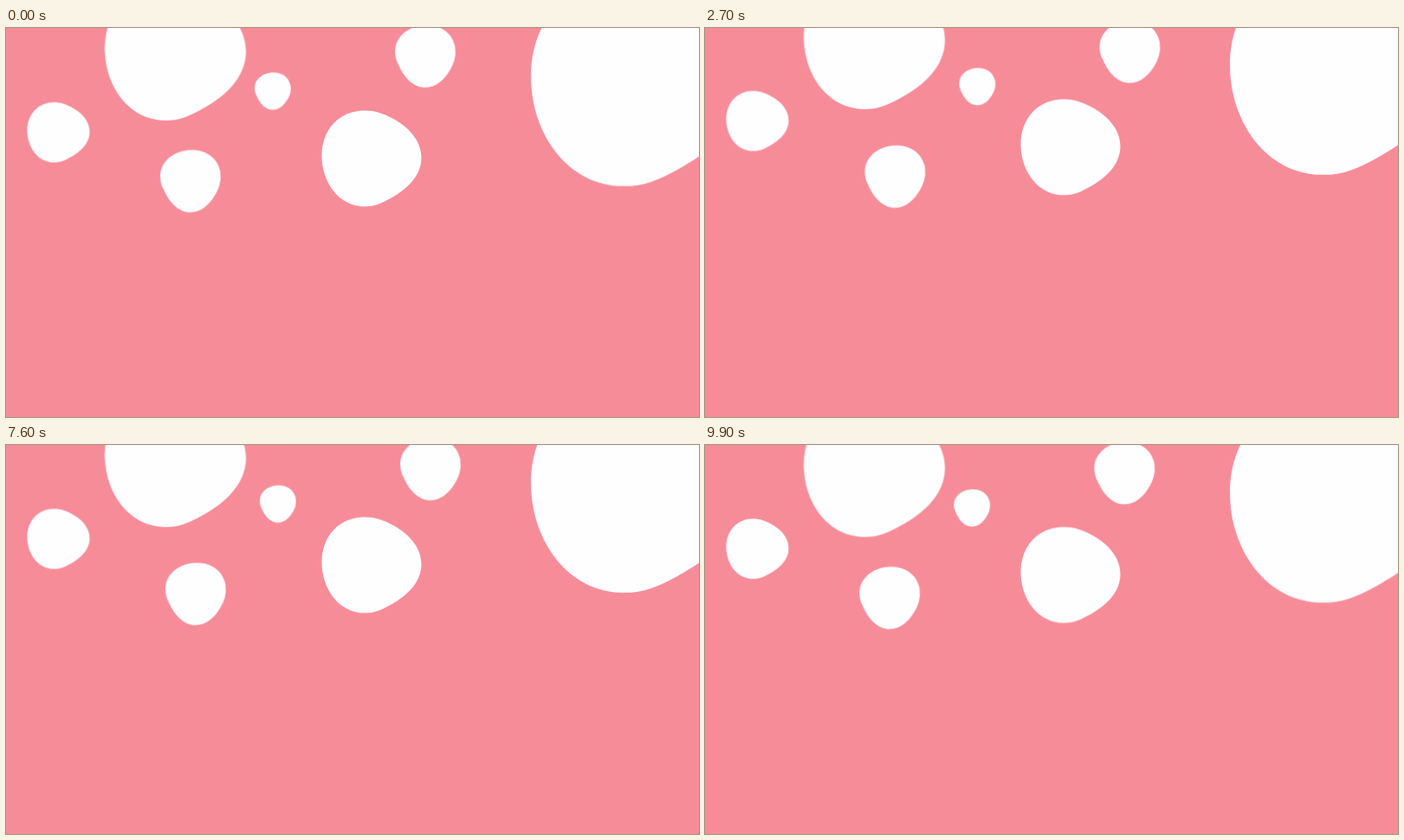
An HTML page for the animation above (10 s loop, 800 by 450 pixels).

```html
<!DOCTYPE html>
<html lang="en">
<head>
<meta charset="utf-8">
<title>Drifting blobs</title>
<style>
  html, body { margin: 0; width: 100%; height: 100%; overflow: hidden; background: #f78c99; }
  svg { display: block; width: 800px; height: 450px; }
</style>
</head>
<body>
<svg viewBox="0 0 800 450" fill="#fefdff">
  <defs>
    <path id="blob" d="M-57.5 -3 C-57.5 -34 -37 -55.5 -8 -55.5 C4 -55.5 13 -52 22 -47.5
      C41 -38 57.5 -22 57.5 -1 C57.5 23 36 38.5 21 46.5 C10 52.5 3 55.5 -8 55.5
      C-38 55.5 -57.5 27 -57.5 -3Z"/>
  </defs>
  <g id="rising">
    <use href="#blob" transform="translate(60.5 120.75) scale(.626)"/>
    <use href="#blob" transform="translate(195.5 28.4) scale(1.417)"/>
    <use href="#blob" transform="translate(422 151)"/>
    <use href="#blob" transform="translate(730.2 63.1) scale(2.16)"/>
  </g>
  <g id="drifting">
    <use href="#blob" transform="translate(212.6 177.2) rotate(92) scale(.628)"/>
    <use href="#blob" transform="translate(307.8 73.1) rotate(92) scale(.376)"/>
    <use href="#blob" transform="translate(483.7 32.8) rotate(92) scale(.628)"/>
  </g>
</svg>
<script>
  // Quadratic ease-out to the far point, then the same path in reverse.
  const timing = {
    duration: 5000,
    iterations: Infinity,
    direction: 'alternate',
    easing: 'cubic-bezier(.33333, .66667, .66667, 1)'
  };

  function sway(id, dx, dy) {
    document.getElementById(id).animate([
      { transform: 'translate(0px, 0px)' },
      { transform: `translate(${dx}px, ${dy}px)` }
    ], timing);
  }

  sway('rising', 0, -16.67);
  sway('drifting', 8.2, -6.67);
</script>
</body>
</html>
```
